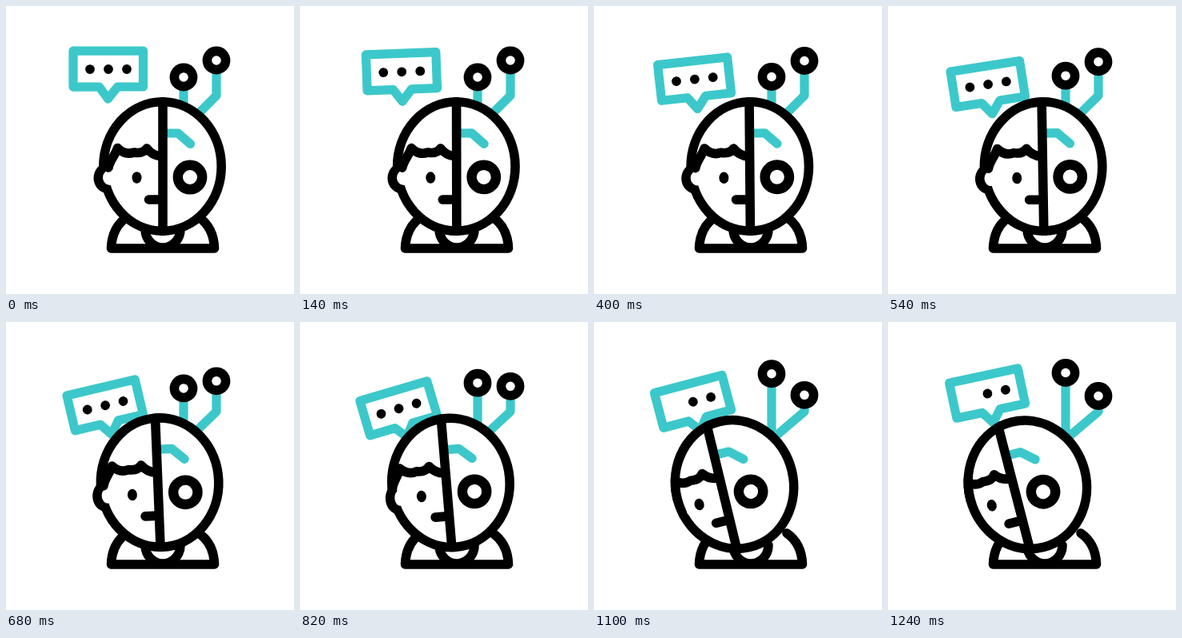
Animation, 360 px wide and 360 px high, one loop 1.34 s. Source, as an HTML page:

```html
<!DOCTYPE html>
<html lang="en">
<head>
<meta charset="utf-8">
<title>Human and machine</title>
<style>
  html, body { margin: 0; width: 100%; height: 100%; overflow: hidden; background: #fff; }
  svg { display: block; width: 100%; height: 100%; }
  .ink, .teal { fill: none; stroke: #000; stroke-width: 11.6; stroke-linecap: round; stroke-linejoin: round; }
  .teal { stroke: #3cc8ca; stroke-width: 11.2; }
  .white { fill: #fff; }
</style>
</head>
<body>
<svg viewBox="0 0 360 360">
  <defs>
    <clipPath id="skull"><ellipse cx="195.5" cy="200.5" rx="79.500" ry="86.500"/></clipPath>
  </defs>

  <g class="ink">
    <path d="M151 264C138 273 132 287 131.500 303H260.500C260 287 254 273 241 264"/>
    <path d="M174 279A22 23 0 0 0 218 279"/>
  </g>

  <g id="bubble">
    <path class="teal" d="M-87.500 -45H0V0H-32L-44 15L-55 0H-87.500Z"/>
    <circle id="dot" cx="-66.500" cy="-22" r="5.900"/>
    <circle cx="-43.500" cy="-22" r="5.900"/>
    <circle cx="-20.500" cy="-22" r="5.900"/>
  </g>

  <path id="wireA" class="teal"/>
  <path id="wireB" class="teal"/>
  <circle id="nodeA" class="ink white" cx="222" r="11.600"/>
  <circle id="nodeB" class="ink white" cx="263" r="11.600"/>

  <g id="head">
    <ellipse id="ear" cx="127" cy="215" ry="19"/>
    <ellipse class="ink white" cx="195.5" cy="200.5" rx="73.700" ry="80.700"/>
    <ellipse id="earHole" class="white" cx="130" cy="214.500" ry="9.500"/>
    <g clip-path="url(#skull)">
      <g id="face">
        <path class="teal" d="M200 159H215L230.500 172.500"/>
        <path class="ink" d="M196 119V282M178.500 242H196"/>
        <path class="ink" d="M128 202C130 192 136 188 139.500 177.500Q149 187 160 183Q171 185 176 178Q183 187 194 188"/>
        <ellipse cx="163.500" cy="214.500" rx="6" ry="7.300"/>
        <circle class="ink" cx="230" cy="214" r="15.200" style="stroke-width:12.400"/>
      </g>
    </g>
  </g>
</svg>
<script>
const LOOP = 1340;
const TIMES = [0, 260, 540, 820, 960, 1100, 1240];
const $ = id => document.getElementById(id);
const set = (id, name, value) => $(id).setAttribute(name, value);

// Smooth curve through the keys that never overshoots them
function track(keys) {
  const n = keys.length;
  const rise = keys.slice(1).map((v, i) => (v - keys[i]) / (TIMES[i + 1] - TIMES[i]));
  const slope = keys.map((_, i) => {
    if (i === 0) return rise[0];
    if (i === n - 1) return rise[n - 2];
    const a = rise[i - 1], b = rise[i];
    return a * b > 0 ? 2 * a * b / (a + b) : 0;
  });
  return t => {
    if (t >= TIMES[n - 1]) return keys[n - 1];
    let i = 0;
    while (t >= TIMES[i + 1]) i++;
    const d = TIMES[i + 1] - TIMES[i], u = (t - TIMES[i]) / d, w = 1 - u;
    return w * w * ((1 + 2 * u) * keys[i] + u * d * slope[i])
      + u * u * ((1 + 2 * w) * keys[i + 1] - w * d * slope[i + 1]);
  };
}

const turn = track([0, 0.015, 0.065, 0.33, 0.75, 0.94, 1]);
const swap = track([0, 0, 0.07, 0.5, 0.82, 0.95, 1]);
const tilt = track([0, -4, -8.9, -16.5, -17, -14.8, -12]);
const drop = track([0, 3.4, 12, 16, 15.5, 9, 1]);

function draw(t) {
  const p = turn(t), q = swap(t);

  set('bubble', 'transform', `translate(171.500 ${101 + drop(t)}) rotate(${tilt(t)})`);
  set('dot', 'visibility', t < 880 ? 'visible' : 'hidden');

  const a = 89 - 25.5 * q, b = 68 + 24.5 * q;
  set('nodeA', 'cy', a);
  set('nodeB', 'cy', b);
  set('wireA', 'd', `M222 ${a}V142`);
  set('wireB', 'd', `M263 ${b}V112L${238 - 14 * p} ${137 + 8 * p}`);

  set('head', 'transform', `rotate(${-14.5 * p} 196 285)`);
  set('face', 'transform', `translate(${-17.7 * p} 0)`);

  // The ear flattens into the outline as the head turns
  set('ear', 'rx', 17.5 - 9 * p);
  set('earHole', 'rx', 9 * (1 - p));
}

const start = performance.now();
function tick() {
  draw((performance.now() - start) % LOOP);
  requestAnimationFrame(tick);
}
draw(0);
requestAnimationFrame(tick);
</script>
</body>
</html>
```
